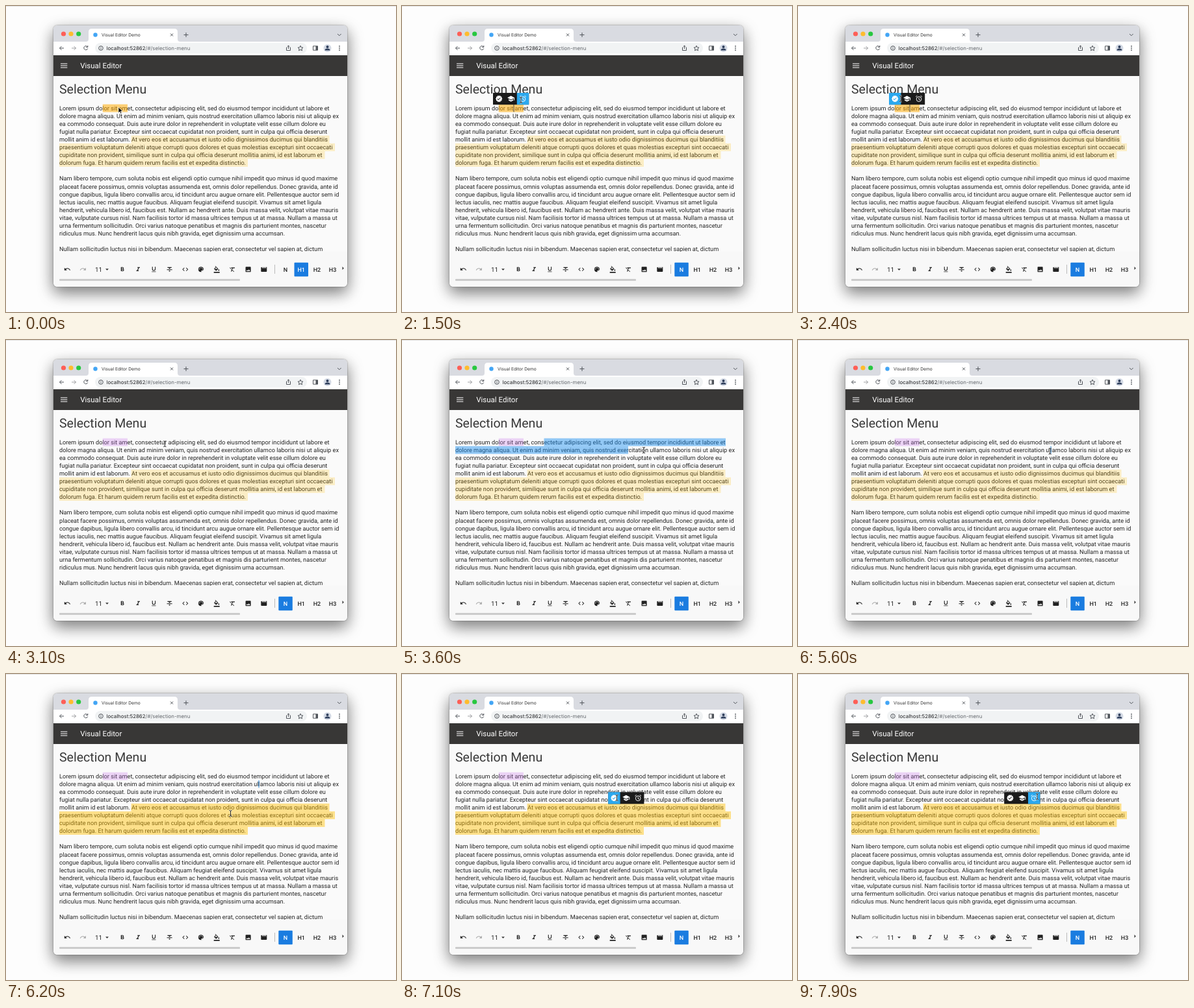
These frames come from a looping animation (600x472 px, 8 s). An HTML page:

```html
<!DOCTYPE html>
<html lang="en">
<head>
<meta charset="utf-8">
<title>Selection menu</title>
<style>
  html, body { margin: 0; width: 100%; height: 100%; overflow: hidden; background: #fdfdfd; }
  svg { display: block; text-rendering: geometricPrecision; }
  text { font-family: Roboto, sans-serif; white-space: pre; }
  .chrome text { font-family: Inter, sans-serif; }
  .line { fill: none; stroke: #50545a; stroke-width: 1; }
  .shadow { filter: drop-shadow(0 9px 12px rgba(0, 0, 0, .4)) drop-shadow(0 0 1px rgba(0, 0, 0, .45)); }
  #body text { font-size: 9.2px; fill: #242424; }
  .style { font-size: 9px; font-weight: 500; text-anchor: middle; fill: #222; }
</style>
</head>
<body>
<svg width="600" height="472" viewBox="0 0 600 472">
  <defs>
    <clipPath id="win"><rect x="73" y="30" width="452" height="403" rx="6"/></clipPath>
    <clipPath id="page"><rect x="73" y="108" width="452" height="271"/></clipPath>
  </defs>
  <rect width="600" height="472" fill="#fdfdfd"/>
  <rect width="600" height="1" fill="#e4e4e4"/>
  <rect class="shadow" x="73" y="30" width="452" height="403" rx="6" fill="#fafafa"/>

  <g clip-path="url(#win)">
    <g class="chrome">
      <rect x="73" y="30" width="452" height="26" fill="#d9dbe1"/>
      <rect x="73" y="55" width="452" height="21" fill="#fff"/>
      <path d="M123 55q4 0 4-4V40q0-5 5-5h127q5 0 5 5v11q0 4 4 4z" fill="#fff"/>
      <circle cx="88.5" cy="43" r="3.6" fill="#fe5f57"/>
      <circle cx="100" cy="43" r="3.6" fill="#febc2e"/>
      <circle cx="111.7" cy="43" r="3.6" fill="#28c840"/>
      <circle cx="137.5" cy="44.5" r="3.2" fill="#42a5f5"/>
      <text x="147" y="47" font-size="6.7" fill="#333">Visual Editor Demo</text>
      <path class="line" d="M253 42.5l4 4m0-4l-4 4M273.5 44.5h7m-3.500-3.500v7M510 43l2.800 2.800 2.800-2.800"/>
      <path class="line" d="M89 65h-6.500m3-3l-3 3 3 3"/>
      <path class="line" d="M101 65h6.500m-3-3l3 3-3 3" stroke-opacity=".55"/>
      <path class="line" d="M125.300 63a3 3 0 1 0 .4 2.500M125.800 61v2.500h-2.500"/>
      <rect x="137" y="57" width="326" height="16" rx="8" fill="#f1f3f4"/>
      <circle class="line" cx="146" cy="65" r="3.300" stroke-width=".8"/>
      <path class="line" d="M146 64.500v2.200m0-3.800v.9" stroke-width=".8"/>
      <text x="154.500" y="67.800" font-size="7.900" fill="#202124">localhost:52862<tspan fill="#62666b">/#/selection-menu</tspan></text>
      <path class="line" d="M432.500 64h-1v4.500h6V64h-1m-2 2v-5m-1.700 1.700l1.700-1.700 1.700 1.700" stroke-width=".8"/>
      <path class="line" d="M453 61.200l1.200 2.600 2.800.3-2.100 1.900.6 2.800-2.500-1.400-2.500 1.400.6-2.800-2.100-1.900 2.800-.3z" stroke-width=".8"/>
      <path class="line" d="M472.500 61.800h7v6.400h-7z"/>
      <path d="M476.500 62h3v6h-3z" fill="#50545a"/>
      <circle cx="494.500" cy="65" r="6" fill="#d4dae5"/>
      <circle cx="494.500" cy="63" r="2" fill="#2f3f5c"/>
      <path d="M490.500 68.500q0-3 4-3t4 3z" fill="#2f3f5c"/>
      <g fill="#50545a"><circle cx="513" cy="62" r=".9"/><circle cx="513" cy="65" r=".9"/><circle cx="513" cy="68" r=".9"/></g>
    </g>

    <rect x="73" y="76" width="452" height="32" fill="#383736"/>
    <path d="M84 89h10.300m-10.300 3h10.300m-10.300 3h10.300" stroke="#fff" stroke-width="1.200"/>
    <text x="114.200" y="96.100" font-size="11.500" fill="#fff">Visual Editor</text>

    <text x="82" y="135" font-size="19.550" fill="#393939">Selection Menu</text>
    <g id="body" clip-path="url(#page)"></g>
    <g id="marks"></g>
    <g id="select" fill="#2190ee" fill-opacity=".48"></g>
    <rect id="caret" width="1" height="11.500"/>

    <g id="bar">
      <rect x="73" y="379" width="452" height="54" fill="#f8f8f8"/>
      <rect x="82" y="421" width="278" height="3" rx="1" fill="#cbcbcb"/>
      <text x="137" y="409.800" font-size="9.800" fill="#222">11</text>
      <path d="M153 405.200h5l-2.500 2.600zM517.500 402l2.300 2.500-2.300 2.500z" fill="#333"/>
      <path d="M413.500 399v14" stroke="#bbb"/>
      <rect id="active" y="395.800" width="21.500" height="21.500" rx="1" fill="#1a7ce0"/>
    </g>
    <g id="menu"></g>
  </g>
  <path id="arrow" d="M0 0v9l2.100-1.900 1.400 3.200 1.500-.7-1.400-3.100h2.900z" fill="#000" stroke="#fff" stroke-width=".7"/>
  <g id="beam" fill="none">
    <path d="M-2-4.500q2 0 2 1.300 0-1.300 2-1.300M0-3.500v7M-2 4.500q2 0 2-1.300 0 1.300 2 1.300" stroke="#fff" stroke-opacity=".75" stroke-width="1.800"/>
    <path d="M-2-4.500q2 0 2 1.300 0-1.300 2-1.300M0-3.500v7M-2 4.500q2 0 2-1.300 0 1.300 2 1.300" stroke="#111" stroke-width=".9"/>
  </g>
</svg>
<script>
const LOOP = 8000, STEP = 100, LEFT = 82, TOP = 151.6, ROW = 12.05, CELL = 18.4;
const $ = id => document.getElementById(id);

function add(parent, tag, attrs, text) {
  const el = document.createElementNS('http://www.w3.org/2000/svg', tag);
  for (const k in attrs) el.setAttribute(k, attrs[k]);
  if (text) el.textContent = text;
  return parent.appendChild(el);
}
const set = (el, attrs) => { for (const k in attrs) el.setAttribute(k, attrs[k]); };
const show = (el, on) => el.setAttribute('visibility', on ? 'visible' : 'hidden');

const copy = `Lorem ipsum dolor sit amet, consectetur adipiscing elit, sed do eiusmod tempor incididunt ut labore et
dolore magna aliqua. Ut enim ad minim veniam, quis nostrud exercitation ullamco laboris nisi ut aliquip ex
ea commodo consequat. Duis aute irure dolor in reprehenderit in voluptate velit esse cillum dolore eu
fugiat nulla pariatur. Excepteur sint occaecat cupidatat non proident, sunt in culpa qui officia deserunt
mollit anim id est laborum. At vero eos et accusamus et iusto odio dignissimos ducimus qui blanditiis
praesentium voluptatum deleniti atque corrupti quos dolores et quas molestias excepturi sint occaecati
cupiditate non provident, similique sunt in culpa qui officia deserunt mollitia animi, id est laborum et
dolorum fuga. Et harum quidem rerum facilis est et expedita distinctio.

Nam libero tempore, cum soluta nobis est eligendi optio cumque nihil impedit quo minus id quod maxime
placeat facere possimus, omnis voluptas assumenda est, omnis dolor repellendus. Donec gravida, ante id
congue dapibus, ligula libero convallis arcu, id tincidunt arcu augue ornare elit. Pellentesque auctor sem id
lectus iaculis, nec mattis augue faucibus. Aliquam feugiat eleifend suscipit. Vivamus sit amet ligula
hendrerit, vehicula libero id, faucibus est. Nullam ac hendrerit ante. Duis massa velit, volutpat vitae mauris
vitae, vulputate cursus nisl. Nam facilisis tortor id massa ultrices tempus ut at massa. Nullam a massa ut
urna fermentum sollicitudin. Orci varius natoque penatibus et magnis dis parturient montes, nascetur
ridiculus mus. Nunc hendrerit lacus quis nibh gravida, eget dignissim urna accumsan.

Nullam sollicitudin luctus nisi in bibendum. Maecenas sapien erat, consectetur vel sapien at, dictum`;
copy.split('\n').forEach((s, i) => add($('body'), 'text', { x: LEFT, y: TOP + 9.4 + i * ROW }, s));

const band = (parent, row, x1, x2) =>
  add(parent, 'rect', { x: x1, y: TOP + row * ROW, width: x2 - x1, height: ROW });
const word = band($('marks'), 0, 148.8, 187);
const quote = add($('marks'), 'g', { fill: '#ffbe00' });
[[192.5, 497.5], [LEFT, 506], [LEFT, 490.5], [LEFT, 372]].forEach(([a, b], i) => band(quote, 4 + i, a, b));
const selRows = [0, 1].map(r => band($('select'), r, LEFT, LEFT));

// Icons live on a 24-unit grid, centred on (x, y).
function icon(parent, x, y, d, fill = '#222', scale = .45) {
  const g = add(parent, 'g', { transform: `translate(${x} ${y}) scale(${scale}) translate(-12 -12)`, fill });
  add(g, 'path', { d, 'fill-rule': 'evenodd' });
  return g;
}
const undo = 'M12.5 8c-2.65 0-5.05.99-6.9 2.6L2 7v9h9l-3.62-3.62c1.39-1.16 3.16-1.88 5.12-1.88 3.54 0 6.55 2.31 7.6 5.5l2.37-.78C21.08 11.03 17.15 8 12.5 8z';
const tools = [
  'M7 4h6.5a4 4 0 0 1 2.100 6.800A3.800 3.800 0 0 1 14 18H7zM10 6.500v3h3a1.500 1.500 0 0 0 0-3zM10 12.500v3h3.500a1.500 1.500 0 0 0 0-3z',
  'M10 4v3h2.21l-3.42 8H6v3h8v-3h-2.21l3.42-8H18V4z',
  'M12 17a6 6 0 0 0 6-6V3h-2.500v8a3.500 3.500 0 0 1-7 0V3H6v8a6 6 0 0 0 6 6zM5 19v2h14v-2z',
  'M10 19h4v-3h-4zM5 4v3h5v3h4V7h5V4zM3 14h18v-2H3z',
  'M9.400 16.600L4.800 12l4.600-4.600L8 6l-6 6 6 6zM14.600 16.600l4.600-4.600-4.600-4.600L16 6l6 6-6 6z',
  'M12 3a9 9 0 0 0 0 18 1.500 1.500 0 0 0 1.100-2.500 1.500 1.500 0 0 1 1.100-2.500H16a5 5 0 0 0 5-5c0-4.400-4-8-9-8z',
  'M16.560 8.940L7.620 0 6.210 1.410l2.380 2.380-5.150 5.150a1.500 1.500 0 0 0 0 2.120l5.500 5.500a1.500 1.500 0 0 0 2.120 0l5.500-5.500a1.500 1.500 0 0 0 0-2.120zM5.210 10L10 5.210 14.790 10zM19 11.500s-2 2.170-2 3.500a2 2 0 0 0 4 0c0-1.330-2-3.500-2-3.500zM2 20h20v4H2z',
  'M3.270 5L2 6.270l6.970 6.970L6.500 19h3l1.570-3.660L16.730 21 18 19.730zM6 5v.18L8.820 8h2.400l-.72 1.680 2.100 2.100L14.210 8H20V5z',
  'M5 3h14a2 2 0 0 1 2 2v14a2 2 0 0 1-2 2H5a2 2 0 0 1-2-2V5a2 2 0 0 1 2-2zM8.500 13.500L5 18h14l-4.500-6-3.500 4.500z',
  'M18 4l2 4h-3l-2-4h-2l2 4h-3l-2-4H8l2 4H7L5 4H4a2 2 0 0 0-2 2v12a2 2 0 0 0 2 2h16a2 2 0 0 0 2-2V4z'
];
const bar = $('bar');
icon(bar, 94.3, 406, undo);
icon(bar, 118.4, 406, undo, '#aaa').setAttribute('transform', 'translate(118.4 406) scale(-.45 .45) translate(-12 -12)');
tools.forEach((d, i) => {
  const g = icon(bar, 179 + i * 24.2, 406.3, d);
  if (i === 5) [[6.5, 10.5], [9.5, 6.5], [14.5, 6.5], [17.5, 10.5]].forEach(([cx, cy]) =>
    add(g, 'circle', { cx, cy, r: 1.5, fill: '#f8f8f8' }));
});
const styles = ['N', 'H1', 'H2', 'H3'].map((s, i) =>
  add(bar, 'text', { class: 'style', x: 430 + i * 24.2, y: 409.7 }, s));

const menu = $('menu');
add(menu, 'rect', { width: CELL * 3, height: 18.2, fill: '#1b1b1b' });
const cells = [0, 1, 2].map(i => add(menu, 'rect', { x: i * CELL, width: CELL, height: 18.2, fill: '#2ba8ee' }));
icon(menu, 9.2, 9.1, 'M23 12l-2.440-2.790.34-3.690-3.610-.82-1.890-3.200L12 2.960 8.600 1.500 6.710 4.690 3.100 5.500l.34 3.700L1 12l2.440 2.790-.34 3.700 3.610.82L8.600 22.500l3.400-1.470 3.400 1.460 1.890-3.190 3.610-.82-.34-3.690zM10.090 16.720l-3.800-3.810 1.480-1.480 2.320 2.330 5.850-5.870 1.480 1.480z', '#fff', .48);
icon(menu, 27.6, 9.1, 'M5 13.180v4L12 21l7-3.820v-4L12 17zM12 3L1 9l11 6 9-4.910V17h2V9z', '#fff', .5);
set(icon(menu, 46, 9.1, 'M20 13a8 8 0 1 1-16 0 8 8 0 0 1 16 0M12 8.500V14l4 2M2 5.700l4.600-3.900M22 5.700l-4.600-3.900', 'none', .48),
  { stroke: '#fff', 'stroke-width': 2 });

// Pointer path: time, x, y.
const path = [
  [0, 173, 156], [1000, 173, 157], [1300, 182, 147], [1500, 183, 145], [2000, 180, 143],
  [2200, 150, 143], [2400, 158, 143], [2600, 149, 143], [3000, 218.5, 158], [3500, 348, 169],
  [3600, 372, 170], [3800, 379, 170], [4000, 379, 170], [4300, 357, 145], [4500, 341, 143],
  [4600, 347, 142], [4700, 371, 140], [5100, 376, 143], [5500, 389, 170], [5800, 385, 175],
  [6200, 345.5, 215], [6500, 346, 215], [7000, 326, 191], [7400, 344, 191], [7900, 368, 189], [8000, 369, 189]
];
function pointer(t) {
  const i = Math.max(1, path.findIndex(p => p[0] >= t));
  const [t0, x0, y0] = path[i - 1], [t1, x1, y1] = path[i];
  const k = (t - t0) / (t1 - t0);
  return [x0 + (x1 - x0) * k, y0 + (y1 - y0) * k];
}
const between = (t, a, b) => t >= a && t < b;

// Start, end, left and top of each menu.
const menus = [[200, 2700, 140, 134], [4000, 5500, 331, 134], [6500, LOOP, 317.2, 182.2]];

function draw(t) {
  const [x, y] = pointer(t), [lx, ly] = pointer(Math.max(0, t - STEP));

  show($('arrow'), t < 100);
  show($('beam'), t >= 100);
  set($('arrow'), { transform: `translate(${x} ${y})` });
  set($('beam'), { transform: `translate(${x} ${y})` });

  const style = t < 100 ? 1 : 0;
  set($('active'), { x: 419.3 + style * 24.2 });
  styles.forEach((s, i) => s.style.fill = i === style ? '#fff' : '#222');

  const pink = t >= 2600;
  set(word, { fill: pink ? '#c878e6' : '#ffab00', 'fill-opacity': pink ? .3 : .53 });
  set(quote, { 'fill-opacity': t > 5800 && y > 199 || t >= 6500 ? .45 : .21 });

  // The selection trails the pointer by one step.
  const selecting = between(t, 3100, 5500), end = t < 4000 ? lx : 379;
  const low = selecting && (t >= 4000 || ly > TOP + ROW);
  show($('select'), selecting);
  set(selRows[0], { x: 218.5, width: low ? 279.5 : Math.max(0, end - 218.5) });
  set(selRows[1], { width: low ? end - LEFT : 0 });

  const first = between(t, 100, 3000);
  show($('caret'), first || between(t, 5500, 6500));
  set($('caret'), { x: first ? 171.5 : 388.5, y: first ? 152 : 164, fill: first ? '#444' : '#2186dc' });

  const open = menus.find(m => between(t, m[0], m[1]));
  menu.style.display = open ? '' : 'none';
  if (open) {
    const [, , mx, my] = open, over = ly >= my && ly <= my + 18.2;
    set(menu, { transform: `translate(${mx} ${my})` });
    cells.forEach((c, i) => c.style.display = over && Math.floor((lx - mx) / CELL) === i ? '' : 'none');
  }
}

const start = performance.now();
function tick() {
  const t = (performance.now() - start) % LOOP;
  draw(Math.floor(t / STEP) * STEP);
  requestAnimationFrame(tick);
}
tick();
</script>
</body>
</html>
```
